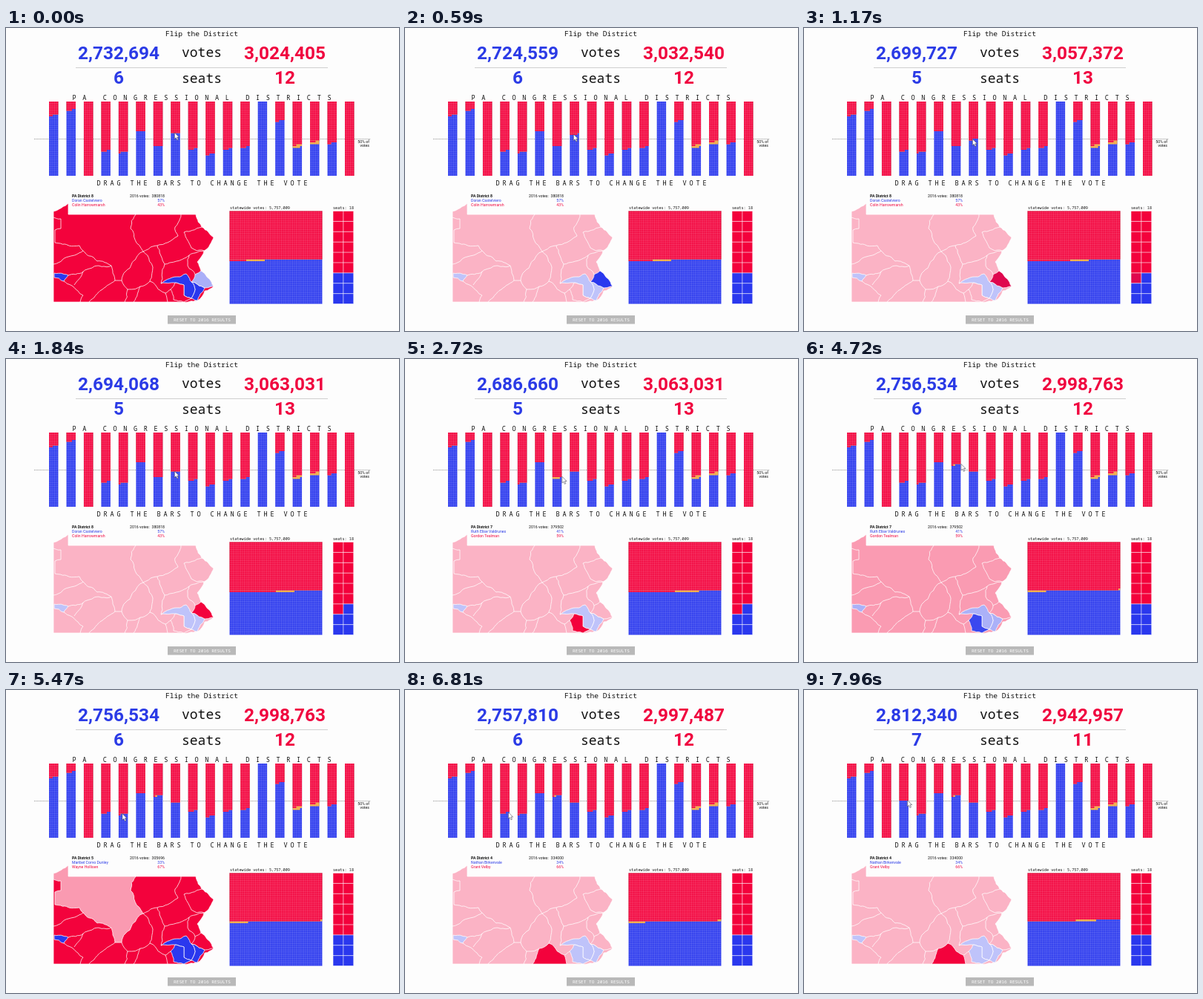
An HTML page with a canvas that plays this animation: 530x408 px, repeating every 8 s.

```html
<!DOCTYPE html>
<html lang="en">
<head>
<meta charset="utf-8">
<title>Flip the District</title>
<style>
  html, body { margin: 0; width: 530px; height: 408px; overflow: hidden; background: #fdfdfd; }
  canvas, svg { position: absolute; left: 0; top: 0; }
  text { fill: #111; font-family: Roboto, sans-serif; font-size: 5.2px; }
  .mono { font-family: "Noto Sans Mono", monospace; font-weight: 500; }
  .word { font-size: 18px; }
  .big { font-size: 24.4px; font-weight: 700; }
  .mid { text-anchor: middle; }
  .end { text-anchor: end; }
  .blue { fill: #2b3be6; }
  .red { fill: #f0053f; }
  #map path { stroke: #fff; stroke-width: .75; stroke-linejoin: round; }
  #map .lines { fill: none; }
</style>
</head>
<body>
<canvas id="stage" width="530" height="408"></canvas>
<svg width="530" height="408" viewBox="0 0 530 408">
  <text class="mono mid" x="264" y="11" style="font-size:9.6px">Flip the District</text>
  <text id="blueVotes" class="big blue mid" x="152" y="42"></text>
  <text class="mono word mid" x="264" y="39.3">votes</text>
  <text id="redVotes" class="big red mid" x="376" y="42"></text>
  <path d="M94 53.5H434" stroke="#c4c4c4" stroke-width=".8"/>
  <text id="blueSeats" class="big blue mid" x="152" y="75"></text>
  <text class="mono word mid" x="264" y="74">seats</text>
  <text id="redSeats" class="big red mid" x="376" y="75"></text>
  <text class="mono" x="89.4" y="97" style="font-size:8.5px;letter-spacing:8.66px">PA CONGRESSIONAL DISTRICTS</text>
  <text class="mono" x="122.4" y="212.3" style="font-size:8.5px;letter-spacing:3.9px">DRAG THE BARS TO CHANGE THE VOTE</text>
  <text class="end" x="490" y="155.3">50% of</text>
  <text class="end" x="490" y="160.3">votes</text>

  <g id="map"></g>

  <text id="district" x="89" y="228" style="font-weight:700"></text>
  <text x="167" y="228">2016 votes:</text>
  <text id="cast" class="end" x="214" y="228"></text>
  <text id="blueName" class="blue" x="89" y="233.7"></text>
  <text id="bluePct" class="blue end" x="214" y="233.7"></text>
  <text id="redName" class="red" x="89" y="239.5"></text>
  <text id="redPct" class="red end" x="214" y="239.5"></text>

  <text class="mono" x="302" y="244">statewide votes: 5,757,009</text>
  <text class="mono" x="441" y="244">seats: 18</text>
  <rect x="218" y="387" width="92" height="11.5" fill="#b9b9b9"/>
  <text class="mono mid" x="264.5" y="395" style="font-size:6.1px;fill:#fff">RESET TO 2016 RESULTS</text>
  <path id="cursor" d="M0 0V8.6L2 6.8 3.5 10 5 9.3 3.6 6.2H6.2Z" fill="#fff" stroke="#445" stroke-width=".6"/>
</svg>
<script>
const LOOP = 8000, FADE = 150, SEAT_FADE = 100;
const RED = [243, 2, 60], BLUE = [42, 56, 238], WHITE = [255, 255, 255], ORANGE = '#f0a63c';
const $ = id => document.getElementById(id);
const ctx = $('stage').getContext('2d');

const clamp = v => Math.max(0, Math.min(1, v));
const ramp = (t, start, length) => clamp((t - start) / length);
const smooth = k => k * k * (3 - 2 * k);
const lerp = (a, b, k) => a + (b - a) * k;
const mix = (a, b, k) => a.map((v, i) => lerp(v, b[i], k));
const css = c => `rgb(${c.map(Math.round)})`;

// Value at time t along [time, value] points.
const track = (points, t) => points.reduce((v, [time, value], i) =>
  i ? lerp(v, value, ramp(t, points[i - 1][0], time - points[i - 1][0])) : value, 0);

// Red share of each bar before any drag.
const startShare = [.185, .115, 1, .6665, .68, .4, .598, .424, .64, .71, .64, .615, 0, .26, .585, .54, .56, 1];

// Pointer stops: where on the bar it grips, and when it enters, presses, releases and leaves.
// moves: votes shifted to red; open: votes left undecided.
const visits = [
  { id: 8, grip: 5, enter: -FADE, press: 400, release: 1950, leave: 2080, cast: 380818,
    blue: ['Doran Castelviero', 57], red: ['Colin Harrowmarsh', 43],
    moves: [[400, 0], [1170, 32967], [1700, 38626]] },
  { id: 7, grip: 13, enter: 2300, press: 2500, release: 4700, leave: 4900, cast: 379502,
    blue: ['Ruth Elise Valdrunes', 41], red: ['Gordon Tealman', 59],
    moves: [[3350, 0], [4060, -51618], [4400, -64268]],
    open: [[2500, 0], [2720, 7408], [3000, 7408], [3300, 0], [4250, 0], [4400, 1802]] },
  { id: 5, grip: 5, enter: 5300, press: LOOP, release: LOOP, leave: 5560, cast: 305696,
    blue: ['Maribel Corvo Dunley', 33], red: ['Wayne Hollisen', 67] },
  { id: 4, grip: 11, enter: 5800, press: 6620, release: LOOP, leave: LOOP, cast: 334000,
    blue: ['Nathan Birkenvale', 34], red: ['Grant Velby', 66],
    moves: [[6700, 0], [6810, -1276], [7960, -55806]] }
];
const visitOf = id => visits.find(v => v.id === id);
const moved = (v, t) => v.moves ? track(v.moves, t) : 0;
const undecided = (v, t) => v.open ? track(v.open, t) : 0;
const share = (v, t) => startShare[v.id - 1] + moved(v, t) / v.cast;
const barX = i => 58 + i * 23.47;

// A seat flips the moment its bar crosses one half.
for (const v of visits) {
  v.wasRed = share(v, 0) > .5;
  v.flip = 0;
  while (v.flip < LOOP && share(v, v.flip) > .5 === v.wasRed) v.flip += 10;
}
const redness = (v, t, fade) => {
  const k = fade ? ramp(t, v.flip, fade) : +(t >= v.flip);
  return v.wasRed ? 1 - k : k;
};
const seatsRed = (t, fade) => 12 + visits.reduce((n, v) => n + redness(v, t, fade) - v.wasRed, 0);

const noise = (x, y) => {
  const n = Math.sin(x * 12.9898 + y * 78.233) * 43758.5453;
  return n - Math.floor(n) - .5;
};

// Roughen an edge by midpoint displacement; straight borders follow the axes.
function rough([x, y], [u, v]) {
  const length = Math.hypot(u - x, v - y);
  if (length < 5 || x === u || y === v) return [[u, v]];
  const mx = (x + u) / 2, my = (y + v) / 2;
  const mid = [mx + noise(mx, my) * length * .22, my + noise(my, mx) * length * .22];
  return [...rough([x, y], mid), ...rough(mid, [u, v])];
}

function outline(text, closed) {
  const points = text.split(' ').map(p => p.split(',').map(Number));
  if (closed) points.push(points[0]);
  const edge = points.flatMap((p, i) => i ? rough(points[i - 1], p) : [p]);
  return 'M' + edge.map(p => p.map(n => n.toFixed(1))).join('L') + (closed ? 'Z' : '');
}

const state = '64,247 84,236 84,251 256,251 264,268 280,282 267,300 258,315 263,327 280,348 268,354 258,367 240,369 64,369';
const shapes = {
  5: '64,247 84,236 84,251 175,251 168,270 185,301 161,328 156,340 147,340 142,320 104,300 99,293 66,289 66,272 74,270 74,257 64,255',
  4: '172,369 181,348 194,341 215,357 218,369',
  6: '209,344 224,336 243,331 250,342 255,352 250,364 240,360 240,346 228,343',
  7: '228,343 240,346 240,360 250,364 240,369 226,366 222,352',
  1: '250,342 258,345 268,350 262,358 258,367 250,364 255,352',
  8: '250,342 255,332 263,327 280,348 268,350 258,345',
  14: '65,330 84,333 78,341 65,336'
};
const borders = [
  '64,318 84,308 104,300', '142,320 104,328 84,333', '147,340 130,352 112,369', '78,341 104,360 100,369',
  '104,328 92,346', '156,340 164,352 181,348', '164,352 160,369', '185,301 198,322 194,341',
  '236,251 228,268 232,280 204,293 185,301', '264,268 240,275 250,296 267,300',
  '204,293 214,318 209,344', '214,318 247,306 267,300', '247,306 245,320 255,332', '215,357 222,352'
];

function addPath(d, name) {
  const p = document.createElementNS('http://www.w3.org/2000/svg', 'path');
  p.setAttribute('d', d);
  if (name) p.setAttribute('class', name);
  $('map').append(p);
  return p;
}
const land = addPath(outline(state, true));
addPath(borders.map(b => outline(b)).join(''), 'lines');
const areas = Object.keys(shapes).map(id => [+id, addPath(outline(shapes[id], true))]);
areas.push([0, land]);

function districtColor(id, t) {
  const v = visitOf(id);
  if (v) return mix(BLUE, RED, redness(v, t, SEAT_FADE));
  return [1, 6, 14].includes(id) ? BLUE : RED;
}

// Hover lightens one district; dragging lightens all the others.
const strength = (id, t) => visits.reduce((s, v) => {
  const hover = ramp(t, v.enter, FADE) * (1 - ramp(t, v.leave, FADE));
  const drag = ramp(t, v.press, FADE) * (1 - ramp(t, v.release, FADE));
  return s * lerp(1, id === v.id ? lerp(.4, 1, drag) : lerp(1, .3, drag), hover);
}, 1);

function setText(values) {
  for (const id in values) $(id).textContent = values[id];
}

function drawMap(t) {
  for (const [id, path] of areas) {
    path.setAttribute('fill', css(mix(WHITE, districtColor(id, t), strength(id, t))));
  }
  const { id, cast, blue, red } = visits.filter(v => v.enter <= t).pop();
  setText({
    district: 'PA District ' + id, cast,
    blueName: blue[0], bluePct: blue[1] + '%',
    redName: red[0], redPct: red[1] + '%'
  });
}

// Fill the first n cells, row by row.
function run(x, y, cols, size, n, color) {
  const rows = Math.floor(n / cols);
  ctx.fillStyle = color;
  ctx.fillRect(x, y, cols * size, rows * size);
  ctx.fillRect(x, y + rows * size, (n % cols) * size, size);
}

function mesh(x, y, cols, rows, size, color, width) {
  ctx.beginPath();
  for (let c = 0; c <= cols; c++) {
    ctx.moveTo(x + c * size, y);
    ctx.lineTo(x + c * size, y + rows * size);
  }
  for (let r = 0; r <= rows; r++) {
    ctx.moveTo(x, y + r * size);
    ctx.lineTo(x + cols * size, y + r * size);
  }
  ctx.strokeStyle = color;
  ctx.lineWidth = width;
  ctx.stroke();
}

function grid(x, y, cols, rows, red, open) {
  const size = 2.5;
  run(x, y, cols, size, cols * rows, css(BLUE));
  run(x, y, cols, size, red + open, ORANGE);
  run(x, y, cols, size, red, css(RED));
  mesh(x, y, cols, rows, size, 'rgba(255,255,255,.3)', .5);
}

function drawBars(t) {
  startShare.forEach((s, i) => {
    const v = visitOf(i + 1);
    const open = v ? undecided(v, t) / v.cast : i === 14 || i === 15 ? .035 : 0;
    grid(barX(i), 99, 5, 40, Math.round(200 * (v ? share(v, t) : s)), Math.round(200 * open));
  });
}

function drawSeats(t) {
  const shown = seatsRed(t, SEAT_FADE), size = 13.89;
  for (let i = 0; i < 18; i++) {
    ctx.fillStyle = css(mix(BLUE, RED, clamp(shown - i)));
    ctx.fillRect(441 + (i % 2) * size, 246.5 + Math.floor(i / 2) * size, size, size);
  }
  mesh(441, 246.5, 2, 9, size, 'rgba(255,255,255,.75)', .8);
}

function drawLine() {
  ctx.strokeStyle = '#777';
  ctx.lineWidth = .8;
  ctx.setLineDash([1, 1]);
  ctx.beginPath();
  ctx.moveTo(38, 149.5);
  ctx.lineTo(491, 149.5);
  ctx.stroke();
  ctx.setLineDash([]);
}

// The pointer holds the top of a bar, then glides to the next one.
function pointer(t) {
  const grab = v => [barX(v.id - 1) + v.grip, 98.5 + 100 * share(v, t)];
  return visits.slice(1).reduce((p, v, i) => {
    const from = visits[i].leave;
    return mix(p, grab(v), smooth(ramp(t, from, v.enter - from)));
  }, grab(visits[0]));
}

function draw(t) {
  const shift = visits.reduce((n, v) => n + moved(v, t), 0);
  const open = visits.reduce((n, v) => n + undecided(v, t), 0);
  const redVotes = Math.round(3024405 + shift);
  const blueVotes = Math.round(2732694 - shift - open);
  const redSeats = seatsRed(t);
  setText({
    redVotes: redVotes.toLocaleString('en-US'),
    blueVotes: blueVotes.toLocaleString('en-US'),
    redSeats, blueSeats: 18 - redSeats
  });

  ctx.clearRect(0, 0, 530, 408);
  drawLine();
  drawBars(t);
  grid(301.5, 246.5, 50, 50, Math.round(1309.2 + shift / 2440), 10 + Math.round(open / 2440));
  drawSeats(t);
  drawMap(t);
  $('cursor').setAttribute('transform', `translate(${pointer(t)})`);
}

const start = performance.now();
function frame() {
  const t = (performance.now() - start) % LOOP;
  draw(Math.round(t / 10) * 10);
  requestAnimationFrame(frame);
}
frame();
</script>
</body>
</html>
```
